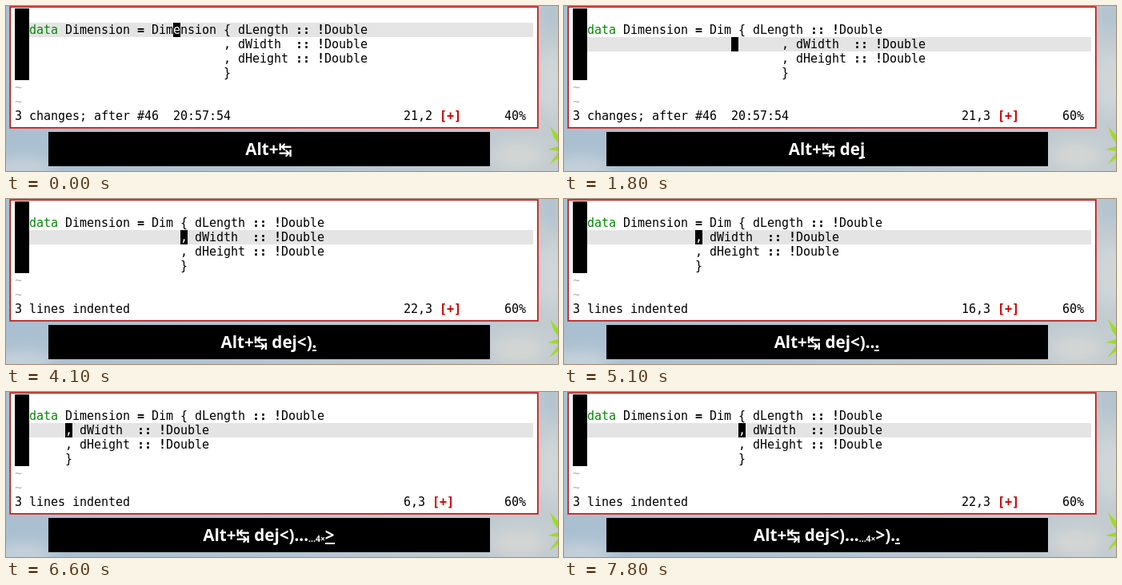
An HTML page that plays this animation: 690 px wide and 207 px high, repeating every 8 s.

```html
<!DOCTYPE html>
<html lang="en">
<head>
<meta charset="utf-8">
<title>Indenting a record in an editor</title>
<style>
  html, body { margin: 0; width: 100%; height: 100%; overflow: hidden; background: #b4c6d4; }
  svg { display: block; width: 690px; height: 207px; }
  text { white-space: pre; }
  #editor { font: 15px "DejaVu Sans Mono", monospace; fill: #000; }
  #editor .bold { font-weight: bold; }
  #editor .keyword { fill: #008700; }
  #editor .flag { font-weight: bold; fill: #cd0000; }
  #editor .tilde { fill: #b2b2b2; }
  #editor .inverse { fill: #fff; }
  #keys { font: bold 20.6px "Noto Sans", "Open Sans", "DejaVu Sans", sans-serif; fill: #fff; }
  #keys .small { font-size: 10.4px; }
</style>
</head>
<body>
<svg viewBox="0 0 690 207" xmlns="http://www.w3.org/2000/svg">
  <defs>
    <linearGradient id="sky">
      <stop offset="0" stop-color="#a9bfd0"/>
      <stop offset=".45" stop-color="#b3c5d3"/>
      <stop offset="1" stop-color="#c3ccd0"/>
    </linearGradient>
    <filter id="soft" x="-50%" y="-50%" width="200%" height="200%">
      <feGaussianBlur stdDeviation="9"/>
    </filter>
  </defs>
  <rect width="690" height="207" fill="url(#sky)"/>
  <g filter="url(#soft)">
    <ellipse cx="20" cy="204" rx="40" ry="14" fill="#c6d2da"/>
    <ellipse cx="640" cy="188" rx="34" ry="17" fill="#d3d6d4"/>
    <ellipse cx="682" cy="95" rx="20" ry="40" fill="#d0d6d8"/>
    <ellipse cx="682" cy="10" rx="20" ry="26" fill="#b4c5d0"/>
  </g>
  <path d="M680 151L690 162V172L685 165ZM677 180L690 176V182ZM679 199L690 184V191Z" fill="#9fdc1e"/>

  <rect x="4" width="662" height="154" fill="#d65050"/>
  <rect x="5" y="1" width="660" height="152" fill="#b01414"/>
  <rect x="6" y="2" width="658" height="150" fill="#fff"/>
  <g id="editor"></g>

  <rect x="53" y="158" width="552" height="43"/>
  <text id="keys" y="187"></text>
  <rect id="underline" y="189" height="2" fill="#fff"/>
</svg>
<script>
const LOOP = 8000, CELL = 9, ROW = 18, LEFT = 11, TOP = 3, KEYS_MID = 328.5;
const CUT = 900, DOWN = 1800, SHIFT = 3600;

// time, key, how long it stays underlined
const presses = [
  [0, "Alt+↹ ", 0], [500, "d", 200], [800, "e", 200], [1800, "j", 200], [3100, "<", 200],
  [3600, ")", 200], [4100, ".", 200], [4500, ".", 100], [5100, ".", 200], [5500, "...4×", 200],
  [6600, ">", 200], [6900, ")", 200], [7400, ".", 200], [7800, ".", 200]
];
// time, column of the field lines
const indents = [
  [0, 28], [3600, 24], [4100, 22], [4600, 18], [5100, 16], [5500, 6],
  [7000, 16], [7400, 18], [7800, 22]
];

const $ = id => document.getElementById(id);
const editor = $("editor"), keys = $("keys"), underline = $("underline");
const escapeText = s => s.replace(/&/g, "&amp;").replace(/</g, "&lt;");

const block = (col, row, cols, rows, fill) =>
  `<rect x="${LEFT + col * CELL}" y="${TOP + row * ROW}" width="${cols * CELL}" height="${rows * ROW}" fill="${fill}"/>`;

// Each glyph sits on the terminal grid.
function put(col, row, str, cls = "") {
  const xs = [...str].map((c, i) => LEFT + (col + i) * CELL);
  return `<text x="${xs.join(" ")}" y="${TOP + row * ROW + 14}" class="${cls}">${escapeText(str)}</text>`;
}

function words(col, row, str, style = () => "") {
  return [...str.matchAll(/::|=|!|[^\s!]+/g)]
    .map(m => put(col + m.index, row, m[0], style(m[0]))).join("");
}

const syntax = w => w === "data" ? "keyword" : /^(::|=|!)$/.test(w) ? "bold" : "";

function drawEditor(t) {
  const indent = indents.filter(e => e[0] <= t).pop()[1];
  const line = t < DOWN ? 2 : 3;
  const column = t < SHIFT ? 21 : indent;
  const pad = " ".repeat(indent - 1);
  const code = [
    `data Dimension = Dim${t < CUT ? "ension" : ""} { dLength :: !Double`,
    pad + ", dWidth  :: !Double",
    pad + ", dHeight :: !Double",
    pad + "}"
  ];
  const place = `${column},${line}`;
  const message = t < SHIFT ? "3 changes; after #46  20:57:54" : "3 lines indented";
  const under = code[line - 2][column - 1];

  return block(0, 0, 2, 5, "#000")
    + block(2, line - 1, 70, 1, "#e4e4e4")
    + code.map((s, i) => words(2, i + 1, s, syntax)).join("")
    + block(column + 1, line - 1, 1, 1, "#000")
    + (under.trim() && put(column + 1, line - 1, under, "inverse"))
    + put(0, 5, "~", "tilde") + put(0, 6, "~", "tilde")
    + words(0, 7, message)
    + put(54, 7, place) + put(55 + place.length, 7, "[+]", "flag")
    + put(68, 7, line === 2 ? "40%" : "60%");
}

function drawKeys(t) {
  const shown = presses.filter(p => p[0] <= t);
  keys.innerHTML = shown.map(([, k], i) => {
    const label = shown.length === 1 ? k.trim() : k;
    return k.endsWith("×")
      ? `<tspan class="small" y="188">${label}</tspan>`
      : `<tspan y="187">${escapeText(label)}</tspan>`;
  }).join("");

  const width = keys.getComputedTextLength();
  const last = keys.lastChild.getComputedTextLength();
  const start = KEYS_MID - width / 2;
  keys.setAttribute("x", start);

  const [time, , hold] = shown[shown.length - 1];
  const from = Math.round(start + width - last), to = Math.round(start + width);
  underline.setAttribute("x", from);
  underline.setAttribute("width", t < time + hold ? to - from : 0);
}

let drawn = -1;
function render(now) {
  // All changes fall on tenths of a second.
  const t = Math.floor((now % LOOP) / 100) * 100;
  if (t !== drawn) {
    drawn = t;
    editor.innerHTML = drawEditor(t);
    drawKeys(t);
  }
}

const begin = performance.now();
function tick() {
  render(performance.now() - begin);
  requestAnimationFrame(tick);
}
tick();
</script>
</body>
</html>
```
